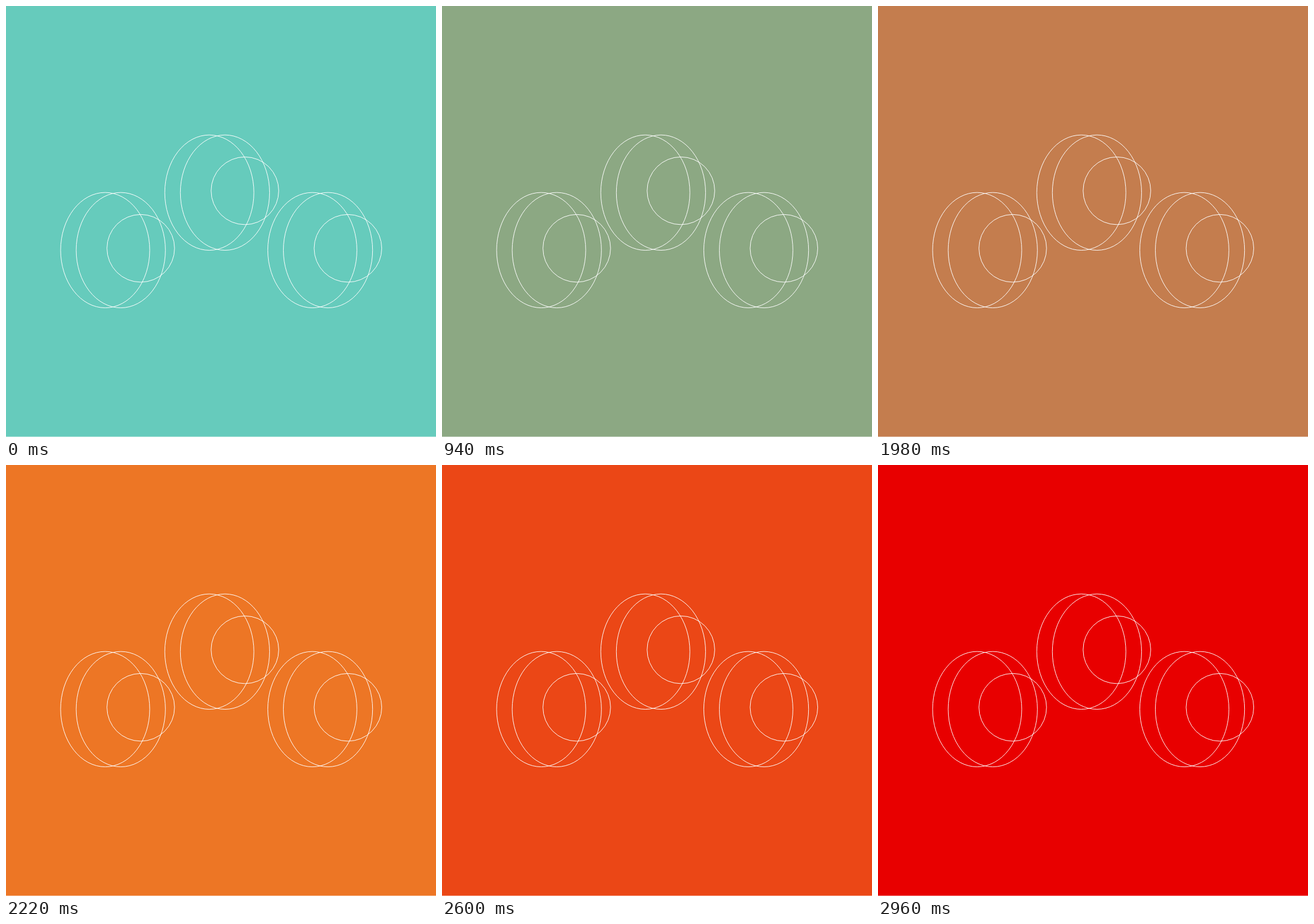
Write an HTML page that moves like this. It is 748x749 px and loops after 3.16 s.

```html
<!DOCTYPE html>
<html lang="en">
<head>
<meta charset="utf-8">
<title>Rings</title>
<style>
  html, body { margin: 0; width: 100%; height: 100%; overflow: hidden; }
  body { background: #66cbbc; }
  svg { display: block; }
</style>
</head>
<body>
<svg width="748" height="749" viewBox="0 0 748 749">
  <defs>
    <g id="rings">
      <ellipse cx="172.5" cy="424.3" rx="77.5" ry="100.2"/>
      <ellipse cx="199.7" cy="424.3" rx="77.6" ry="100.2"/>
      <circle cx="234.4" cy="421.1" r="58.8"/>
    </g>
  </defs>
  <g fill="none" stroke="#fff">
    <use href="#rings"/>
    <use href="#rings" x="181.2" y="-100"/>
    <use href="#rings" x="360.4"/>
  </g>
  <rect y="748" width="748" height="1" fill="#fff" opacity=".5"/>
</svg>
<script>
const LOOP = 3160, HOLD = 200, STEP = 60, STEPS = 10;
const SPAN = HOLD + (STEPS - 1) * STEP;
const colors = [
  [102, 203, 188],
  [141, 172, 130],
  [135, 136, 139],
  [237, 118, 37],
  [232, 0, 0]
];

// Each colour holds, then blends to the next in even steps.
function colorAt(t) {
  const i = Math.floor(t / SPAN);
  const rest = t - i * SPAN;
  const k = rest < HOLD ? 0 : (Math.floor((rest - HOLD) / STEP) + 1) / STEPS;
  const from = colors[i], to = colors[i + 1] || from;
  return from.map((c, n) => Math.round(c + (to[n] - c) * k));
}

function draw() {
  document.body.style.background = `rgb(${colorAt(performance.now() % LOOP)})`;
  requestAnimationFrame(draw);
}
draw();
</script>
</body>
</html>
```
